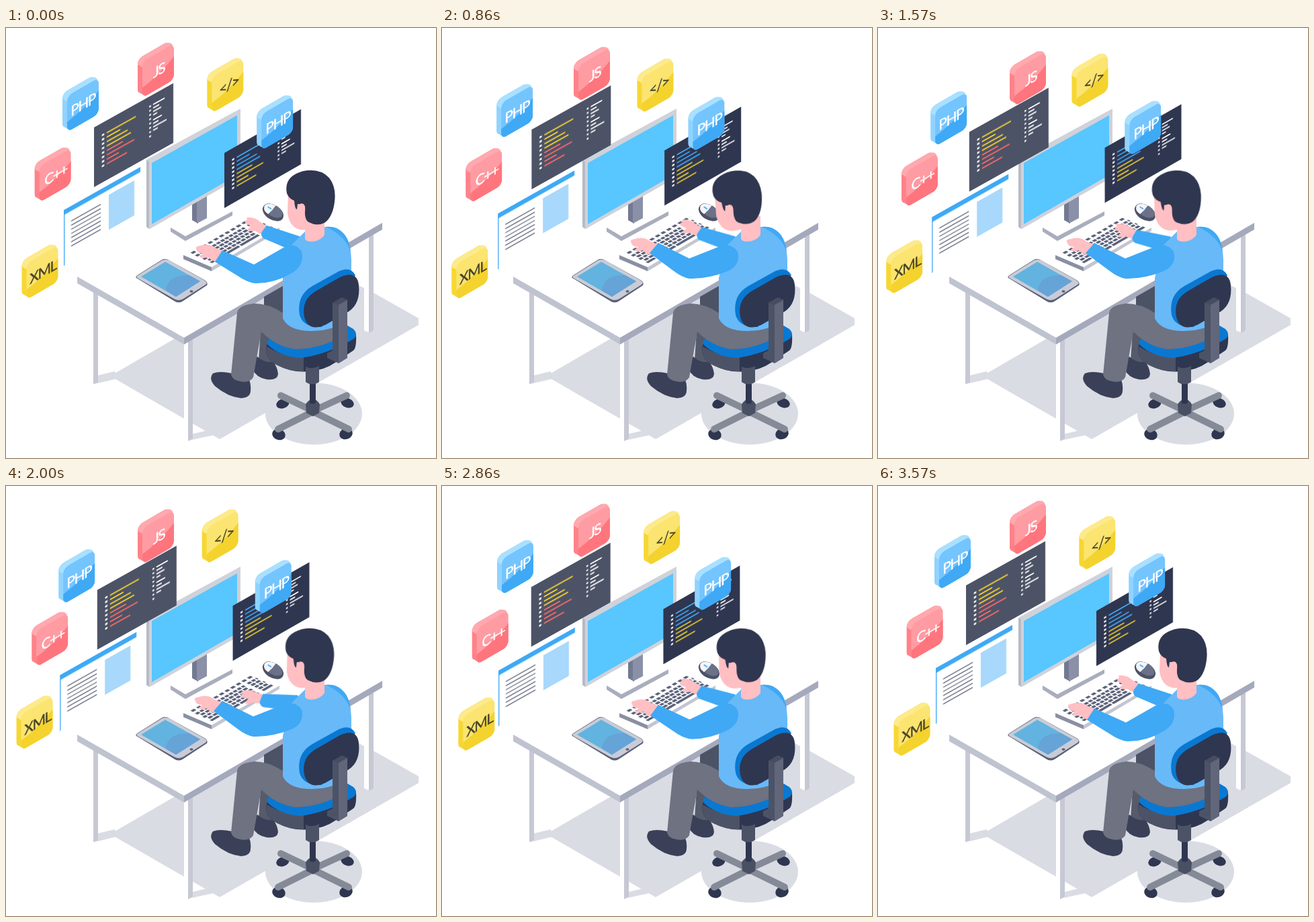
An HTML page without scripts that plays this animation: 640 px wide and 640 px high, repeating every 3640 ms.

```html
<!DOCTYPE html>
<html lang="en">
<head>
<meta charset="utf-8">
<title>Developer at a desk</title>
<style>
  html, body { margin: 0; width: 100%; height: 100%; overflow: hidden; background: #fff; }
  svg { display: block; width: 100%; height: 100%; }

  .pink   { --light: #ff9ba2; --deep: #ff757d; --side: #ff8289; --rim: #ffa9af; }
  .blue   { --light: #74c4fe; --deep: #3fa9f5; --side: #8fd3ff; --rim: #a9e0ff; }
  .yellow { --light: #fbe470; --deep: #f4d32f; --side: #f6d733; --rim: #fdea8a; }
  .tile text { font: 400 21px Lato, "Open Sans", sans-serif; letter-spacing: -1.5px; text-anchor: middle; fill: #fff; stroke: #fff; stroke-width: .4px; }
  .yellow text { fill: #4a4526; stroke: #4a4526; }

  .skin { fill: #ffbfc3; }
  .navy { fill: #2f3650; }
  .slate { fill: #4d5366; }
  .sleeve { fill: #3fa9f5; }
  .line { fill: none; stroke-width: 2; }

  /* The cycle rests for its last 70 ms. */
  .slide, .orbit, .head, .arm-far, .arm-near, .hand-near { animation: 3640ms infinite; }
  .slide { animation-name: slide; animation-timing-function: cubic-bezier(.37, 0, .63, 1); }
  .orbit { animation-name: orbit; animation-timing-function: linear; }
  .head { animation-name: nod; transform-origin: 455px 295px; animation-timing-function: ease-in-out; }
  .arm-far { animation-name: type-far; transform-origin: 440px 322px; animation-timing-function: ease-in-out; }
  .arm-near { animation-name: type-near; animation-timing-function: ease-in-out; }
  .hand-near { animation-name: hand-near; animation-timing-function: ease-in-out; }

  @keyframes slide {
    0%, 98.08%, 100% { transform: translate(0, 0); }
    49.04% { transform: translate(var(--dx), var(--dy)); }
  }
  @keyframes orbit {
    0% { transform: rotate(var(--a)) translateX(var(--r)) rotate(calc(-1 * var(--a))); }
    98.08%, 100% { transform: rotate(calc(var(--a) + var(--turn))) translateX(var(--r)) rotate(calc(-1 * var(--a) - var(--turn))); }
  }
  @keyframes nod {
    0%, 58%, 69%, 98.08%, 100% { transform: translate(0, 0) rotate(0deg); }
    13.7% { transform: translate(-7px, 0) rotate(-4deg); }
    24%, 34% { transform: translate(-9px, 0) rotate(-6deg); }
    55% { transform: translate(-1px, 0) rotate(-.4deg); }
    85%, 88.2% { transform: translate(-8px, 0) rotate(-5deg); }
  }
  @keyframes type-far {
    0%, 33.2%, 98.08%, 100% { transform: rotate(0deg); }
    13.7%, 88.2% { transform: rotate(-5deg); }
    55% { transform: rotate(-16deg); }
    68.7% { transform: rotate(-2deg); }
  }
  @keyframes type-near {
    0%, 85%, 100% { d: path("M322 331 L369 352 L411 328 Q430 317 440 333 Q445 353 425 365 Q398 381 370 380 Q358 378 345 369 L311 348 Z"); }
    12%, 72% { d: path("M322 320 L368 343 L411 326 Q430 318 440 333 Q445 353 425 362 Q395 374 368 373 Q357 371 344 361 L309 335 Z"); }
  }
  @keyframes hand-near {
    0%, 85%, 100% { transform: translate(0, 0); }
    12%, 72% { transform: translate(-2px, -10px); }
  }
</style>
</head>
<body>
<svg viewBox="0 0 640 640" xmlns="http://www.w3.org/2000/svg">
  <defs>
    <rect id="plate" x="-23.5" y="-26" width="47" height="54" rx="8"/>
    <clipPath id="face"><use href="#plate"/></clipPath>
    <g id="tile">
      <g fill="var(--side)">
        <use href="#plate" transform="translate(-7 -4) skewY(-30)"/>
        <use href="#plate" transform="translate(-3.5 -2) skewY(-30)"/>
      </g>
      <path d="M-24 -20 L9 -39 Q19 -43 22 -36 L-15 -16 Q-22 -12 -23.5 -4 L-30.5 -8 Q-30 -16 -24 -20Z" fill="var(--rim)"/>
      <g transform="skewY(-30)" clip-path="url(#face)">
        <path d="M-24 -26 H24 V28 H-24Z" fill="var(--light)"/>
        <path d="M-24 13 Q2 9 24 -7 V28 H-24Z" fill="var(--deep)"/>
      </g>
    </g>
    <g id="code">
      <path d="M0 0 H118 V89 H0Z" fill="var(--bg)"/>
      <path d="M13.5 17 V67" class="line" stroke="#fff" style="stroke-width:3.4" stroke-dasharray="2.8 3.8"/>
      <path d="M19 18.5 h43 M19 25.1 h20 M19 31.7 h31 M19 38.3 h36" class="line" stroke="var(--top)"/>
      <path d="M19 44.9 h24 M19 51.5 h41 M19 58.1 h18 M19 64.7 h30" class="line" stroke="var(--low)"/>
      <path d="M83.5 14 V64" class="line" stroke="#fff" style="stroke-width:2.6" stroke-dasharray="2.4 4"/>
      <path d="M88 15 h17 M88 20.2 h9 M88 25.4 h12 M88 30.6 h6 M88 38 h13 M88 43.2 h8 M88 48.4 h20 M88 53.6 h7" class="line" stroke="#fff"/>
    </g>
  </defs>

  <rect width="640" height="640" fill="#fff"/>

  <!-- floor -->
  <g fill="#dadce4">
    <path d="M162 514 L262 456 L420 370 L525 383 L545 393 L614 432 V442 L318 612 L162 522Z"/>
    <path d="M137 517 L162 511 L165 522 L131 530Z M278 604 L308 597 L318 604 L272 614Z"/>
    <ellipse cx="458" cy="574" rx="72" ry="46"/>
  </g>

  <!-- desk -->
  <path d="M265 465 H271 V612 L265 609Z M533 310 H540 V453 L533 450Z" fill="#fff"/>
  <path d="M130 390 H137 V527 L130 530Z M271 462 H278 V611 L271 615Z M540 308 H547 V450 L540 454Z" fill="#c6c9d4"/>
  <path d="M106 370 L402 199 L560 290 L265 461Z" fill="#fff"/>
  <path d="M106 370 L265 461 V471 L106 380Z" fill="#bfc3d0"/>
  <path d="M265 461 L560 290 V300 L265 471Z" fill="#a5a9bc"/>

  <!-- monitor -->
  <path d="M245 298 L299 267 L337 274 L267 312Z" fill="#fff"/>
  <path d="M245 297 L267 310 L337 273 V279 L267 317 L245 303Z" fill="#a9adbd"/>
  <path d="M277 258 H286 V291 L277 286Z" fill="#737990"/>
  <path d="M284 256 L299 248 V283 L284 291Z" fill="#8a90a7"/>
  <path d="M209 196 L349 120 V222 L214 299 L209 296Z" fill="#cfd2da"/>
  <path d="M209 196 L213 199 V299 L209 296Z" fill="#b6bac7"/>
  <path d="M217 201 L344 130 V219 L217 292Z" fill="#58c6ff"/>

  <!-- keyboard -->
  <path d="M264 338 L365 278 L407 297 L306 356Z" fill="#fff"/>
  <path d="M264 338 L306 356 V362 L264 344Z" fill="#8a8fa3"/>
  <path d="M306 356 L407 297 V302 L306 362Z" fill="#c3c6d1"/>
  <g transform="matrix(1 -.584 1 .45 264 337)" class="line" stroke="#5c627a" style="stroke-width:3.8">
    <path d="M7 5.5 H98" stroke-dasharray="5 3.4"/>
    <path d="M6 13 H78 M83 13 H97 M6 24 H78 M83 24 H97" stroke-dasharray="4.6 1.6"/>
    <path d="M8 18.5 H78 M83 18.5 H97 M8 29.5 H78 M83 29.5 H97" stroke-dasharray="5.4 1.6"/>
    <path d="M6 35 h12 m2 0 h28 m2 0 h27 m6 0 h14"/>
  </g>

  <!-- mouse -->
  <g transform="translate(397.5 274.5) rotate(32)">
    <ellipse rx="17" ry="11" class="slate"/>
    <ellipse cx="-1" cy="-2.5" rx="15" ry="8.5" fill="#6b7188"/>
    <path d="M-2 -11 Q-16 -9 -16 -1 Q-14 6 -5 6 Q-2 -2 -2 -11Z" fill="#f4f5f9"/>
    <path d="M-11 -3 h6" class="line" stroke="#58b4f5"/>
  </g>

  <!-- tablet -->
  <path d="M194 372 Q192 370 197 367 L232 345 Q237 342 243 346 L297 376 Q301 379 299 383 L264 406 Q257 411 250 406Z" fill="#5a6077"/>
  <path d="M195 369 L232 346 Q237 343 243 346 L296 376 Q301 379 297 382 L264 403 Q257 407 250 403 L197 373 Q193 371 195 369Z" fill="#c9ccd6"/>
  <path d="M201 370 L237 348 L289 377 L253 400Z" fill="#62b3e0"/>
  <path d="M238 391 Q240 367 273 368 L289 377 L253 400Z" fill="#66a3d6"/>
  <ellipse cx="276" cy="392" rx="2.5" ry="1.8" fill="#5a6077"/>

  <!-- floating page -->
  <g class="slide" style="--dx:-6px;--dy:11px">
    <g transform="translate(86 271) skewY(-29.4)">
      <path d="M0 0 H114 V83 H0Z" fill="#fff"/>
      <path d="M0 0 H114 V7.5 H0Z M0 0 H1.3 V83 H0Z" fill="#3fa9f5"/>
      <path d="M67 15 H105 V67 H67Z" fill="#a8d8fb"/>
      <path d="M11 22.5 h44 m-44 6.2 h44 m-44 6.2 h44 m-44 6.2 h44 m-44 6.2 h44 m-44 6.2 h44 m-44 6.2 h44" class="line" stroke="#5f6479" style="stroke-width:1.4"/>
    </g>
  </g>

  <!-- floating code -->
  <g class="slide" style="--dx:5px;--dy:7px;--bg:#4d5366;--top:#f5d531;--low:#fb6b6b">
    <use href="#code" transform="translate(131 148) skewY(-29.2)"/>
  </g>
  <g class="slide" style="--dx:13px;--dy:-8px;--bg:#2f3650;--top:#3fa9f5;--low:#f5d531">
    <use href="#code" transform="translate(325 186) skewY(-29.7) scale(.966 .921)"/>
  </g>

  <!-- floating tiles -->
  <g class="tile pink" transform="translate(226.5 62.5)">
    <g class="slide" style="--dx:0px;--dy:13px"><use href="#tile"/><text x="1" y="8" transform="skewY(-30)">JS</text></g>
  </g>
  <g class="tile blue" transform="translate(114.5 113.5)">
    <g class="slide" style="--dx:-6px;--dy:22px"><use href="#tile"/><text y="8" transform="skewY(-30)">PHP</text></g>
  </g>
  <g class="tile pink" transform="translate(70 222.8)">
    <g class="orbit" style="--a:-55deg;--r:5.4px;--turn:-360deg"><use href="#tile"/><text x="1" y="8" transform="skewY(-30)">C++</text></g>
  </g>
  <g class="tile yellow" transform="translate(49 358.5)">
    <g class="orbit" style="--a:42deg;--r:6.7px;--turn:360deg"><use href="#tile"/><text x="1" y="8" transform="skewY(-30)">XML</text></g>
  </g>
  <g class="tile yellow" transform="translate(325 81)">
    <g class="orbit" style="--a:42deg;--r:6.5px;--turn:360deg"><use href="#tile"/><text x="2" y="8" transform="skewY(-30)">&lt;/&gt;</text></g>
  </g>
  <g class="tile blue" transform="translate(401.5 145.5)">
    <g class="orbit" style="--a:-65deg;--r:5.2px;--turn:-360deg"><use href="#tile"/><text x="1" y="8" transform="skewY(-30)">PHP</text></g>
  </g>

  <!-- far arm -->
  <g class="arm-far">
    <path class="skin" d="M357 291 Q354 287 360 285 Q355 282 361 282 Q371 282 376 287 L388 295 L382 307 Q376 306 371 302 Q359 303 359 300 L365 295Z"/>
    <path class="sleeve" d="M388 294 L437 310 L445 328 L418 328 L383 313 Q378 308 381 303Z"/>
  </g>

  <!-- legs -->
  <path class="slate" d="M384 400 L412 384 V425 L384 413Z"/>
  <path d="M379 450 L404 462 L402 499 Q388 502 376 494Z" fill="#565b6c"/>
  <path d="M374 489 Q366 496 367 508 Q372 520 388 523 Q404 525 405 515 Q404 505 398 497 Q384 499 374 489Z" fill="#3a4058"/>
  <path d="M336 514 Q318 510 308 514 Q301 522 311 533 Q330 549 350 551 Q364 550 364 540 Q365 530 362 524Z" fill="#3a4058"/>

  <!-- seat -->
  <path class="navy" d="M389 468 Q382 492 404 502 Q428 514 450 511 Q473 510 490 498 L517 480 Q522 476 521 456Z"/>
  <path class="slate" d="M388 474 Q385 493 404 502 Q424 512 443 511 L443 490 Q414 490 388 474Z"/>
  <path d="M388 470 Q390 462 400 455 L500 438 L517 448 Q525 456 517 463 Q480 485 440 491 Q408 490 388 470Z" fill="#0a78d1"/>
  <path d="M344 424 Q346 412 370 410 Q390 410 412 424 L492 440 V463 Q462 478 430 478 Q402 474 380 452 L368 520 Q362 529 349 526 Q337 524 335 516Z" fill="#6e7281"/>

  <!-- torso -->
  <path d="M446 302 L474 296 Q494 294 505 309 Q513 320 514 345 V405 L487 446 Q465 453 440 450 Q418 446 412 432 V372 L424 324Z" fill="#68b9f8"/>
  <path class="sleeve" d="M476 296 Q494 294 505 309 Q512 319 513 333 Q505 309 476 296Z"/>
  <path class="skin" d="M445 280 H474 V308 Q468 317 455 318 Q447 318 445 314Z"/>

  <!-- head -->
  <g class="head">
    <path class="skin" d="M420 246 L419 276 Q422 296 437 300 Q455 303 470 290 L465 245Z"/>
    <path class="navy" d="M418 246 Q413 221 442 213 Q467 208 481 223 Q492 237 489 259 Q486 282 474 290 Q463 295 453 290 Q444 288 445 271 Q443 261 434 262 L433 270 Q430 270 429 257 Q421 254 418 246Z"/>
    <path class="skin" d="M434 267 Q437 259 443 262 Q447 266 444 278 Q442 286 438 284 Q434 280 434 267Z"/>
  </g>

  <!-- near arm -->
  <path class="skin hand-near" d="M284 330 Q280 325 289 324 Q302 320 311 327 L323 332 L314 348 Q306 347 301 341 Q289 344 289 340 L294 336 Q284 335 284 330Z"/>
  <path class="sleeve arm-near" d="M322 331 L369 352 L411 328 Q430 317 440 333 Q445 353 425 365 Q398 381 370 380 Q358 378 345 369 L311 348 Z"/>

  <!-- chair back -->
  <path d="M437 427 Q432 398 456 384 L492 364 Q512 353 520 368 L470 445 Q442 446 437 427Z" fill="#0a78d1"/>
  <path class="navy" d="M444 430 Q439 404 462 391 L497 371 Q522 360 525 382 Q528 410 510 422 L475 442 Q450 453 444 430Z"/>
  <path class="slate" d="M478 484 L486 480 V409 L500 401 L508 405 V491 L495 499 L478 491Z"/>
  <path d="M495 411 L508 404 V491 L495 499Z" fill="#61667a"/>
  <path d="M486 409 L500 401 L508 405 L495 412Z" fill="#474c60"/>

  <!-- chair base -->
  <path class="slate" d="M446 504 Q456 509 466 503 V527 Q456 534 446 527Z"/>
  <g class="navy">
    <ellipse cx="412" cy="559" rx="10" ry="7" transform="rotate(-20 412 559)"/>
    <ellipse cx="508" cy="558" rx="10" ry="7" transform="rotate(20 508 558)"/>
    <ellipse cx="406" cy="605" rx="10" ry="8" transform="rotate(20 406 605)"/>
    <ellipse cx="506" cy="604" rx="10" ry="8" transform="rotate(-20 506 604)"/>
  </g>
  <path d="M457 570 L409 547 M457 570 L507 547 M457 571 L405 597 M457 571 L510 597" fill="none" stroke="#858a97" stroke-width="10" stroke-linecap="round"/>
  <path d="M446 560 Q457 544 467 560 L466 573 L457 578 L447 573Z" fill="#4a5064"/>
  <path class="navy" d="M452 530 H461 V558 Q456 561 452 558Z"/>
</svg>
</body>
</html>
```
